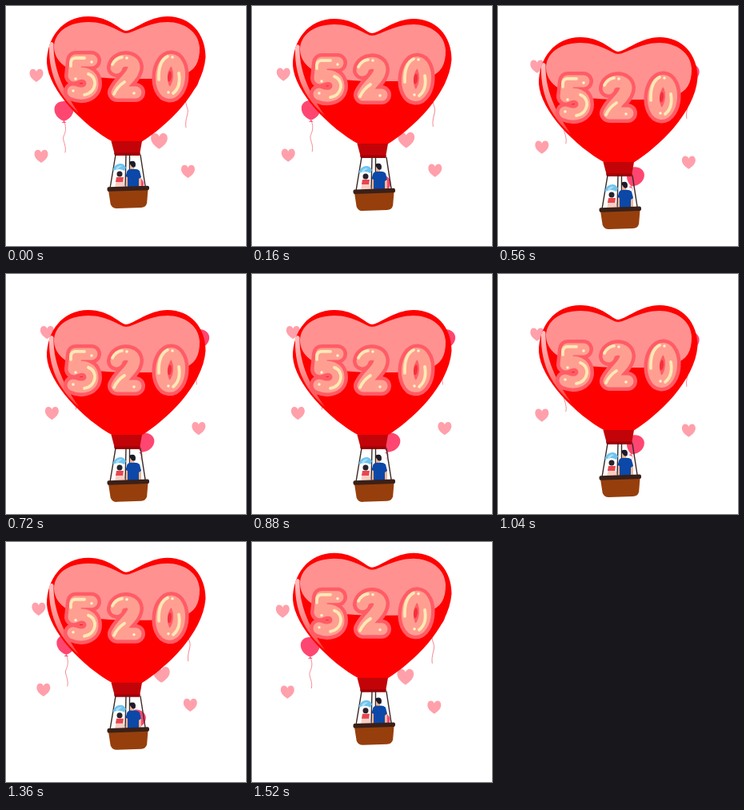
An HTML page that plays this animation: 300 px wide and 300 px high, repeating every 1600 ms.

```html
<!DOCTYPE html>
<html lang="en">
<head>
<meta charset="utf-8">
<title>Balloon ride</title>
<style>
  html, body { margin: 0; width: 100%; height: 100%; overflow: hidden; background: #fff; }
  svg { display: block; width: 100vw; height: 100vh; }
  .line { fill: none; stroke-linecap: round; stroke-linejoin: round; }
</style>
</head>
<body>
<svg viewBox="0 0 300 300">
  <defs>
    <linearGradient id="shine" x1="0" y1="0" x2="0" y2="1">
      <stop offset="0" stop-color="#ffc0c0"/>
      <stop offset=".5" stop-color="#ff9090"/>
      <stop offset="1" stop-color="#ff4040"/>
    </linearGradient>
    <path id="heart" fill="#ffa0ab" d="M0 8C-5 5-8.500 1-8.500-3C-8.500-9-2-10 0-5C2-10 8.500-9 8.500-3C8.500 1 5 5 0 8Z"/>
    <path id="balloon" fill="#ff4670" d="M0 13C-8 10-12 4-12-2C-12-8-7-12 0-12C7-12 12-8 12-2C12 4 8 10 0 13L3 15H-3Z"/>
    <path id="string" class="line" stroke="#f68c98" d="M0 0C3 9 1 13-1 18S3 29 1 38"/>
    <g id="digits" class="line">
      <path d="M107 68H87L85 87C97 81 108 86 108 97C108 108 96 112 84 107"/>
      <path d="M138 77C140 66 159 65 160 76C160 87 145 95 139 108H162"/>
      <ellipse cx="205.500" cy="88" rx="11" ry="20.500" transform="rotate(4 205.500 88)"/>
    </g>
  </defs>

  <g id="drift">
    <use href="#heart" x="38" y="87"/>
    <use href="#heart" x="44" y="188"/>
    <use href="#heart" transform="translate(191.500 169) scale(1.220)"/>
    <use href="#heart" x="227.500" y="207"/>
    <use href="#string" x="73" y="145"/>
    <use href="#balloon" x="72.500" y="131"/>
    <use href="#string" transform="translate(226 108) scale(-1 1.150)"/>
    <use href="#balloon" transform="translate(228.500 95) rotate(10)"/>
    <use href="#string" transform="translate(156 238) scale(1 .3)"/>
    <use href="#balloon" transform="translate(160.500 224.500) rotate(22) scale(.9 1)"/>
  </g>

  <g id="ride">
    <path fill="#f00" d="M150 31C143 31 130 13 103 13C70 13 51 40 51 71C53 105 97 150 134 170H169C200 151 246 108 249.500 64C249.500 34 230 13 202 13C178 13 159 31 150 31Z"/>
    <path fill="#ff9191" d="M150 34C143 34 128 20 103 20C76 20 60 34 60 52C61 76 90 91 150 91C212 91 243 92 242 52C241 32 222 20 202 20C178 20 159 34 150 34Z"/>
    <path fill="url(#shine)" d="M54 50Q56 42 59.500 47C59 75 68 100 91 134C70 116 53 90 54 50Z"/>

    <use href="#digits" stroke="#ff5c66" stroke-width="24"/>
    <use href="#digits" stroke="#ff9f92" stroke-width="15"/>
    <ellipse cx="204.500" cy="88" rx="2.500" ry="6.500" fill="#f5303c" transform="rotate(6 204.500 88)"/>
    <path class="line" stroke="#ffe9b4" stroke-width="3.800" d="M81 75Q80 66 86 65H98M103 85C115 89 114 108 98 111M133 73Q137 65 145 64M135 110Q139 101 148 95M191 92Q190 69 202 63M216 84Q219 101 209 109"/>
    <path class="line" stroke="#fff3cf" stroke-width="3.500" d="M107 70h0M87 91h0M84 106h0M151 65h0M160 109h0M208 64h0M203 108h0"/>

    <path fill="#c20408" d="M131.500 169H170L167 186H136Z"/>
    <path fill="#a00006" d="M135 183.500H168L167 187H136Z"/>
    <path class="line" stroke="#3a2a25" stroke-width="1.400" d="M137 186L130 228M150 186L149 228M154.500 186V228M168 186L174.500 228"/>

    <g>
      <path fill="#f8cfc4" d="M136 227L138 217Q142 211 146 215L149 227Z"/>
      <path fill="#e9464f" d="M138 214H147L146 220H137Z"/>
      <ellipse cx="142" cy="210" rx="3.500" ry="3.500" fill="#27222b"/>
      <path fill="#6fc4ef" d="M133.500 205C136 196 147 194 150 202L148 206Q141 202 134 206Z"/>
      <path fill="#a9e0fa" d="M137 203Q141 198 145 200Q141 202 139 205Z"/>
    </g>
    <g>
      <path fill="#f0b797" d="M155 198h5v7h-5ZM150 212h3v14h-3ZM165 212h4v14h-4Z"/>
      <path fill="#1d1b29" d="M154 196Q155 193 160 194Q163 196 161.500 201Q158 203 156 199Z"/>
      <path fill="#0b48a8" d="M149.500 213L151.500 206Q154 203 158 204Q164 203 167 206L169 214L166 216V227H152V214Z"/>
    </g>

    <g transform="rotate(-2 152 228)">
      <path fill="#963f0c" d="M128 230H177.500L175.500 247Q174 252.500 168 252.500H138Q132 252.500 130 247Z"/>
      <rect x="126.500" y="225.500" width="52.500" height="5.500" rx="2" fill="#3a2018"/>
    </g>
  </g>
</svg>
<script>
  const LOOP = 1600, STEP = 80;
  const [drift, ride] = ['drift', 'ride'].map(id => document.getElementById(id));

  function draw(now) {
    const time = Math.floor((now % LOOP) / STEP) * STEP;
    const phase = (1 - Math.cos(2 * Math.PI * time / LOOP)) / 2;
    drift.setAttribute('transform', `translate(${13.7 * phase} ${-14.2 * phase})`);
    ride.setAttribute('transform', `translate(0 ${32.7 * phase})`);
  }

  const start = performance.now();
  function tick() {
    draw(performance.now() - start);
    requestAnimationFrame(tick);
  }
  tick();
</script>
</body>
</html>
```
